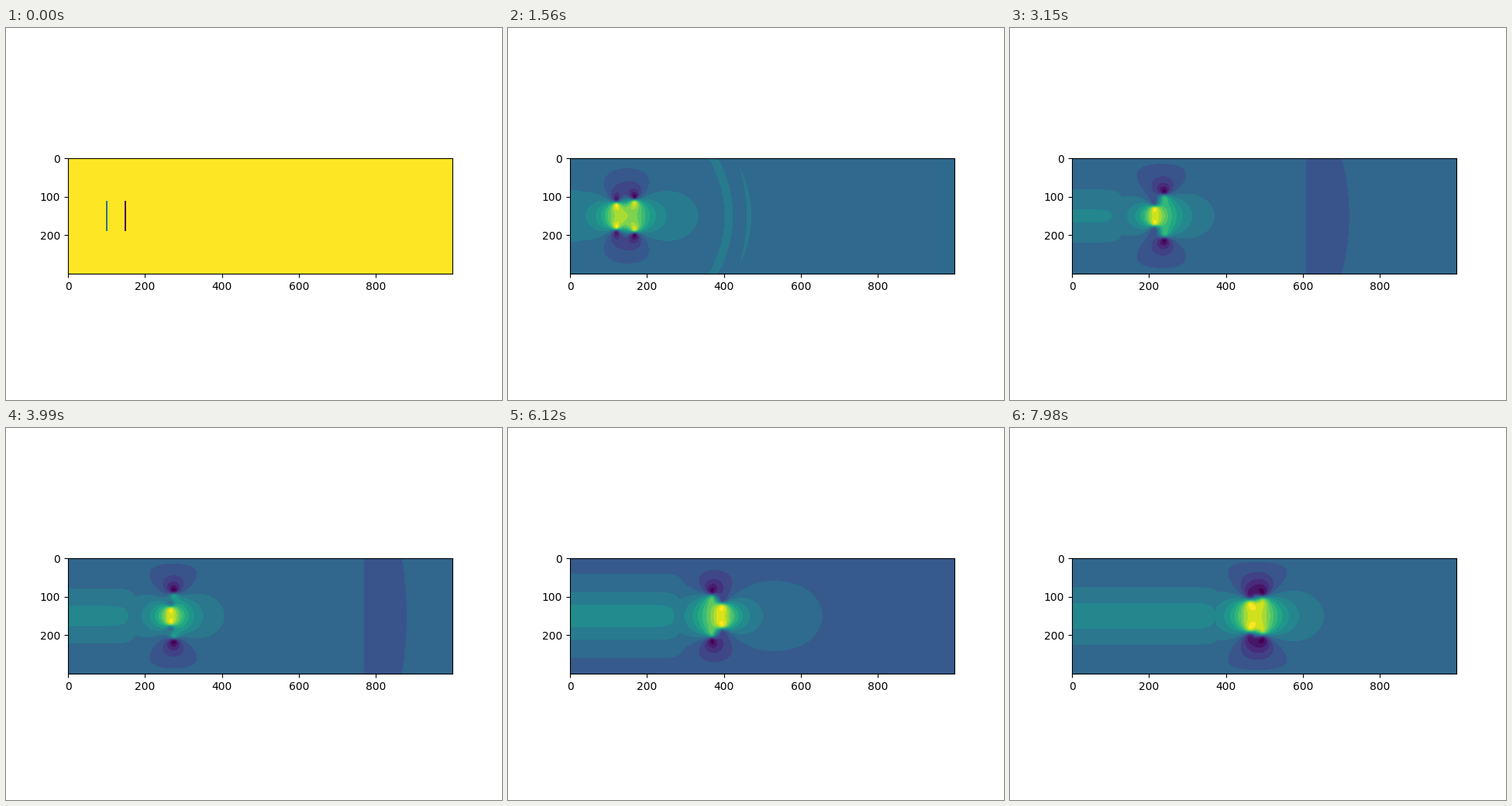
Animation of 640x480 px, one loop 8 s. Source, as a matplotlib script:

```python
import numpy as np
import matplotlib.pyplot as plt
from matplotlib.animation import FuncAnimation

WIDTH, HEIGHT, CELL = 1000, 300, 2
FRAMES, INTERVAL = 250, 32
STEP, BASE = 0.0667, 0.036      # spacing and start of the colour bands
SOUND = 5.8 / 0.03              # cells per second

# The flow is symmetric about the axis, so only the upper half is computed.
x = np.arange(CELL / 2, WIDTH, CELL, dtype=np.float32)[None, :]
y = np.arange(CELL / 2, HEIGHT / 2, CELL, dtype=np.float32)[:, None] - HEIGHT / 2
radius = np.hypot(x - 122, y)
wall = np.tanh((HEIGHT / 2 + y) / 50)


def fade(d, width):
    return 1 / (1 + np.exp(np.clip(d / width, -40, 40)))


def middle(t):
    """Axial position of the pair of rings."""
    return 64 + 52.2 * t + 61 * np.exp(-t / 0.3)


def rings(t):
    """Leapfrogging: (axial position, half height) of each vortex pair."""
    phase = max(0.49 * (t - 4.35), -np.pi / 2)
    gap = (53 - 2.4 * t) / 2 * np.sin(phase)
    squeeze = 17.5 * np.cos(phase)
    height = 38 + 1.1 * t
    for side in (1, -1):
        yield middle(t) + side * gap, height - side * squeeze


def velocity(t):
    """Axial velocity induced by both vortex pairs."""
    core = 7 + 0.6 * t
    u = np.zeros_like(radius)
    for cx, half in rings(t):
        dx2 = (x - cx) ** 2 + core ** 2
        for side in (-1, 1):
            dy = y - side * half
            u -= side * dy / (dx2 + dy ** 2)
    return u * wall * fade(radius - np.hypot(60, 0.97 * SOUND * t), 5)


def sound_wave(t):
    d = radius - SOUND * t
    if t < 1.2:
        return 0
    if t < 3.1:
        crescent = np.abs(d - 47) < 6 * (1 - (y / 130) ** 2)
        return 0.055 * (((d > -16) & (d < 6)) | crescent)
    return -0.04 * ((x > SOUND * t + 2) & (d < -7))


def bands(v, shift):
    level = np.floor((v - BASE) / STEP) + 0.5
    return np.clip(BASE + STEP * level + shift, 0, 1)


def picture(i):
    if i == 0:
        v = np.ones((HEIGHT // CELL, WIDTH // CELL))
        v[55:95, 49:51] = 0.37
        v[55:95, 74:76] = 0
        return v
    t = i * INTERVAL / 1000
    start = np.exp(-(t / 1.6) ** 4)
    dip = np.exp(-((t - 6.1) / 1.3) ** 4)

    rest = 0.32 + 0.04 * start - 0.035 * dip
    u = velocity(t)
    u = np.where(u > 0, u / u.max() * (1 - rest), -u / u.min() * rest)
    wake = ((0.145 * np.tanh(t / 2.5) + 0.035 * dip) * np.exp(-(y / 73) ** 2)
            * fade(x - middle(t) + 90, 12))
    v = rest + u + np.maximum(wake - np.maximum(u, 0), 0) + sound_wave(t)
    half = bands(v, -0.008 + 0.03 * start + 0.02 * dip)
    return np.vstack([half, half[::-1]])


fig, ax = plt.subplots(figsize=(6.4, 4.8), dpi=100)
image = ax.imshow(picture(0), cmap="viridis", vmin=0, vmax=1,
                  interpolation="nearest",
                  extent=(-0.5, WIDTH - 0.5, HEIGHT - 0.5, -0.5))


def update(i):
    image.set_data(picture(i))
    return [image]


anim = FuncAnimation(fig, update, frames=FRAMES, interval=INTERVAL,
                     init_func=lambda: update(0), repeat=True, repeat_delay=0)
plt.show()
```
